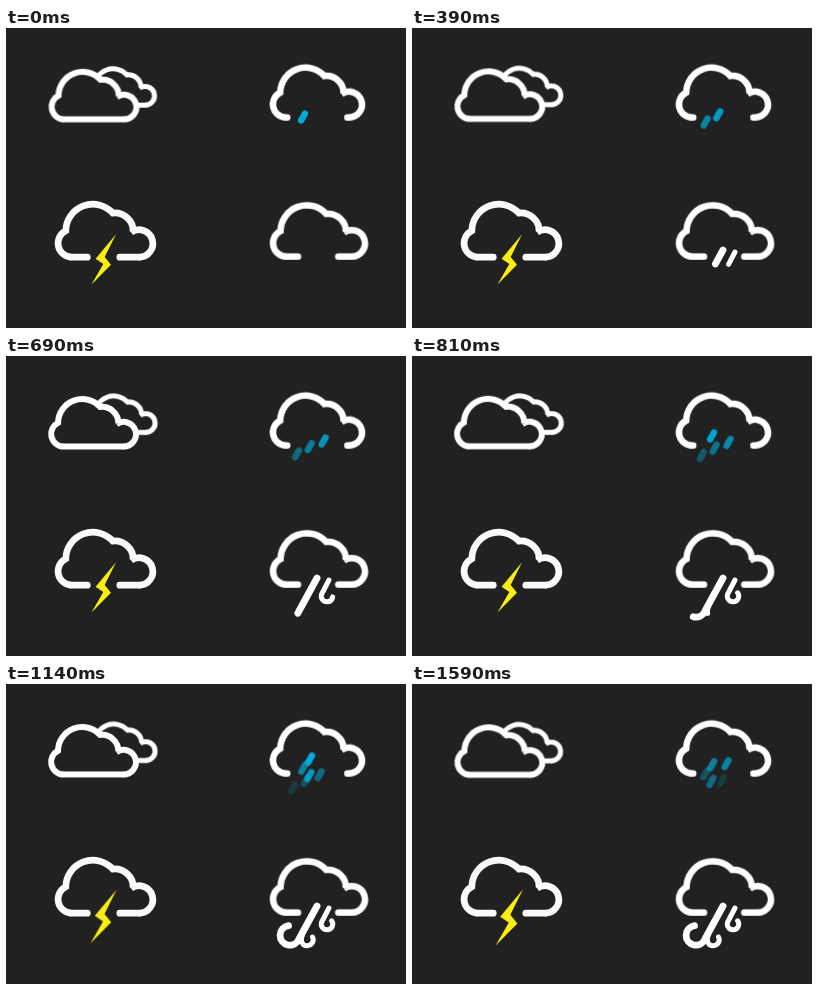
Recreate the animation shown at these times as an HTML page. Size 400 by 300 pixels, loop 1.62 s.

```html
<!DOCTYPE html>
<html lang="en">
<head>
<meta charset="utf-8">
<title>Weather icons</title>
<style>
@property --t { syntax: "<number>"; inherits: true; initial-value: 0; }
html, body { margin: 0; width: 100%; height: 100%; overflow: hidden; background: #212121; }
svg {
  display: block;
  fill: none; stroke: #fff; stroke-width: 6.5; stroke-linecap: round; stroke-linejoin: round;
}
svg, .front, .back, .rain, .bolt, .wind path { animation: 1.62s linear infinite; }
.cloud, .base { vector-effect: non-scaling-stroke; }
.cloud { stroke-linecap: butt; stroke-linejoin: miter; }

svg { animation-name: clock; }
@keyframes clock { from { --t: 0; } to { --t: 1620; } }

.front { fill: #212121; stroke-width: 6; animation-name: front; }
@keyframes front {
  0% { transform: translate(.3px, 1px); }
  33% { transform: translate(0, .4px); }
  50%, 62% { transform: translate(-.3px, 0); }
  100% { transform: translate(.2px, .5px); }
}
.back { stroke-width: 5; animation-name: back; }
@keyframes back {
  0% { transform: translate(0, .8px); }
  33% { transform: translate(.4px, .1px); }
  50%, 62% { transform: translate(.8px, 0); }
  100% { transform: translate(0, .5px); }
}

/* All drops share one drift; each one starts at --s and fades */
.rain { stroke: #00aedb; animation-name: rain; }
@keyframes rain { to { transform: translate(-13.9px, 20.7px); } }
.rain use {
  --age: calc(var(--t) - var(--s));
  opacity: calc(min(1, max(0, var(--age) * 1000)) * (1 - var(--age) / 1400));
}

.bolt { fill: #f9ed14; stroke: none; transform-origin: 102px 214px; animation-name: bolt; }
@keyframes bolt {
  0%, 64% { transform: scale(1); }
  76%, 100% { transform: scale(1.12); }
}

.wind path { stroke-dasharray: 1 2; }
.wind .main { stroke-width: 6.8; animation-name: gust; }
.wind .curl { stroke-width: 5; animation-name: curl; }
.wind .small { stroke-width: 5; animation-name: breeze; }
@keyframes gust {
  0%, 12% { stroke-dashoffset: 1; opacity: 0; }
  12.1% { stroke-dashoffset: 1; opacity: 1; }
  24% { stroke-dashoffset: .8; }
  33.3% { stroke-dashoffset: .68; }
  50% { stroke-dashoffset: .34; }
  61%, 100% { stroke-dashoffset: 0; opacity: 1; }
}
@keyframes curl {
  0%, 47% { stroke-dashoffset: 1; opacity: 0; }
  47.1% { stroke-dashoffset: 1; opacity: 1; }
  61%, 100% { stroke-dashoffset: 0; opacity: 1; }
}
@keyframes breeze {
  0%, 14% { stroke-dashoffset: 1; opacity: 0; }
  14.1% { stroke-dashoffset: 1; opacity: 1; }
  24% { stroke-dashoffset: .65; }
  33.3% { stroke-dashoffset: .3; }
  48%, 100% { stroke-dashoffset: 0; opacity: 1; }
}
</style>
</head>
<body>
<svg width="400" height="300" viewBox="0 0 400 300">
  <defs>
    <path id="cloud" class="cloud" d="M14 53A14 14 0 0 1 8.5 26.5A27 27 0 0 1 55.5 8.9A18.5 18.5 0 0 1 76 27.500M73.800 28.200A13.700 13.700 0 1 1 81.500 53"/>
    <path id="drop" d="M1.9-3.4L-1.9 3.4"/>
  </defs>

  <g class="back">
    <g transform="translate(82.6 39.9) scale(.69)">
      <use href="#cloud"/>
      <path class="base" d="M14 53H81.5"/>
    </g>
  </g>
  <g class="front">
    <g transform="translate(44.6 42.8) scale(.895)">
      <path stroke="none" d="M14 53V27H81.5V53Z"/>
      <use href="#cloud"/>
      <path class="base" d="M14 53H81.5"/>
    </g>
  </g>

  <g transform="translate(266.2 39.6) scale(.94)">
    <use href="#cloud"/>
    <path class="base" d="M14 53H16M81.5 53H80"/>
  </g>
  <g class="rain">
    <use href="#drop" x="297" y="89" style="--s:-30"/>
    <use href="#drop" x="309.6" y="81.7" style="--s:200"/>
    <use href="#drop" x="323.5" y="76.1" style="--s:450"/>
    <use href="#drop" x="307" y="69.6" style="--s:700"/>
    <use href="#drop" x="313.1" y="77.1" style="--s:930"/>
    <use href="#drop" x="313.8" y="60.4" style="--s:1130"/>
    <use href="#drop" x="328.2" y="59.2" style="--s:1150"/>
  </g>

  <g transform="translate(51.3 176.2)" stroke="#fafafa" stroke-width="6.7">
    <use href="#cloud"/>
    <path class="base" d="M14 53H30M81.5 53H62.5"/>
  </g>
  <path class="bolt" d="M110 206.3L89.6 230.7L97.3 236L85.5 256.5L105 236.8L98.7 229Z"/>

  <g transform="translate(266.3 177.2) scale(.97)">
    <use href="#cloud"/>
    <path class="base" d="M14 53H26.5M81.5 53H68"/>
  </g>
  <g class="wind">
    <path class="main" pathLength="1" d="M311 222L293 255A9.800 9.800 0 1 1 282.500 241.700"/>
    <path class="curl" pathLength="1" d="M296 252C294 259 298 262 301 261.8C306 261.5 308.500 257 306.500 253"/>
    <path class="small" pathLength="1" d="M323 224L315.700 238A5.700 5.700 0 1 0 325.600 236.800"/>
  </g>
</svg>
</body>
</html>
```
